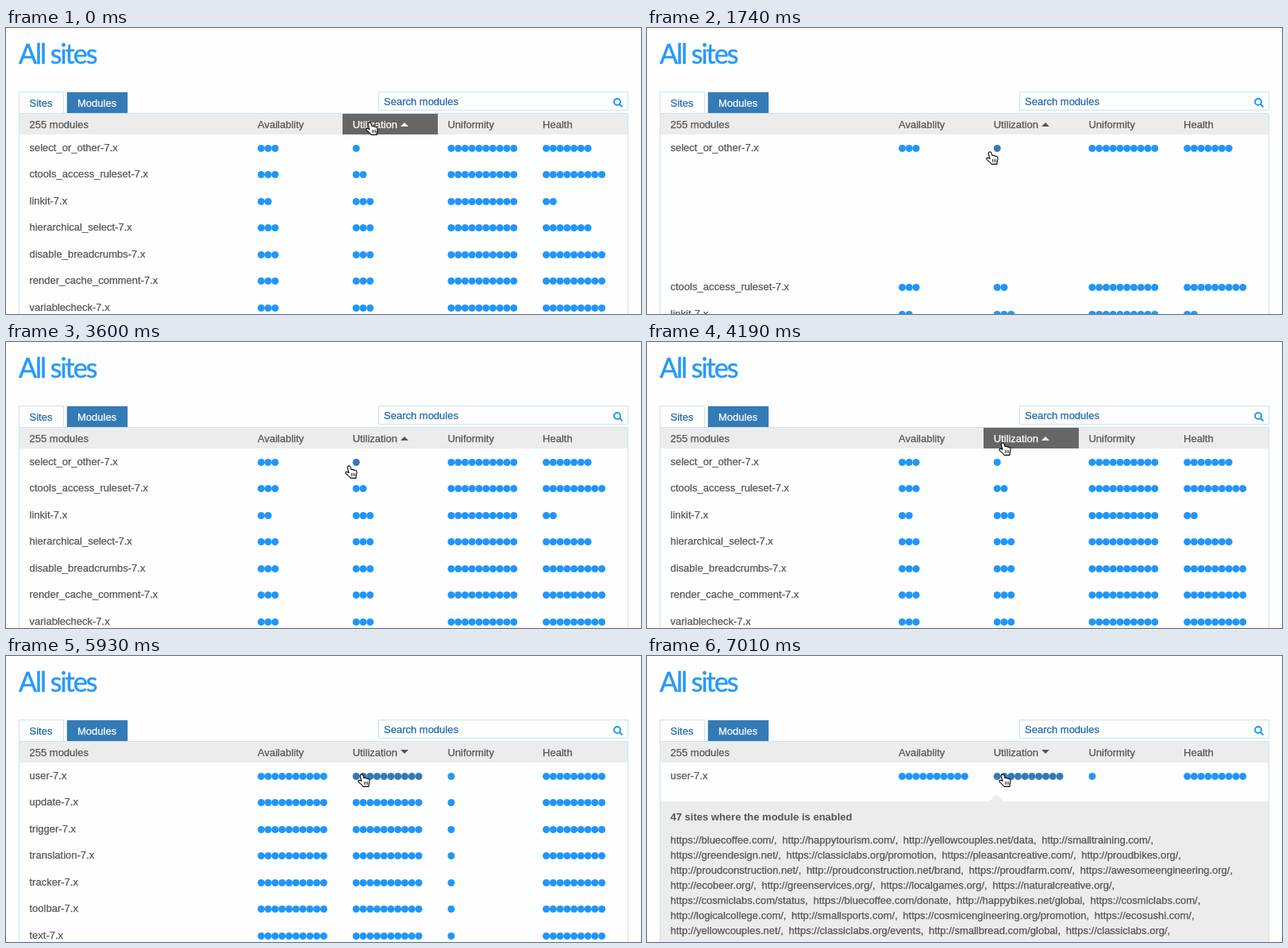
Recreate the animation shown at these times as an HTML page. Size 800 by 360 pixels, loop 8 s.

```html
<!DOCTYPE html>
<html lang="en">
<head>
<meta charset="utf-8">
<title>All sites</title>
<style>
  html, body { margin: 0; width: 100%; height: 100%; overflow: hidden; background: #fefefe; }
  svg { display: block; }
  text {
    font: 13px "Liberation Sans", Arial, sans-serif; white-space: pre;
    color: #555; fill: currentColor; stroke: currentColor; stroke-width: .25px;
  }
  .title { font: 34px Lato, sans-serif; letter-spacing: -2px; color: #2699fb; stroke-width: .5px; }
  .link { color: #2268ae; }
  .light { color: #fff; }
  .bold { font-weight: bold; stroke: none; }
  .sites { word-spacing: -.3px; }
  .dots { fill: #2196f9; }
  .dots.hover { fill: #337ab7; }
  .frame { fill: none; stroke: #cde2f1; }
</style>
</head>
<body>
<svg width="800" height="360" viewBox="0 0 800 360">
  <text class="title" x="16" y="44.5">All sites</text>
  <path class="frame" d="M16.5 108V80.5H72.5V108"/>
  <text class="link" x="29.500" y="99">Sites</text>
  <path fill="#337ab7" d="M77 81h76v26H77z"/>
  <path class="frame" d="M76.5 108V80.5H153.5V108"/>
  <text class="light" x="90" y="99">Modules</text>
  <path class="frame" d="M469.5 80.5h314v23h-314z"/>
  <text class="link" x="476" y="97">Search modules</text>
  <g fill="none" stroke="#2196f9" stroke-width="2">
    <circle cx="770" cy="93" r="4"/>
    <path d="M773 96l3.500 3.500"/>
  </g>
  <path fill="#ececec" d="M17 108h766v26H17z"/>
  <g id="view"></g>
  <path class="frame" d="M16.5 361V107.5H783.5V361"/>
  <g id="cursor" stroke="#000" stroke-linejoin="round" stroke-linecap="round">
    <path fill="#fff" stroke-width="1.1" d="M4 1.2C5.2.4 6.4 1 6.8 2.2L8 5.6c.9-.6 2-.3 2.4.5 .8-.5 1.9-.2 2.3.7 1-.4 2 .2 2.2 1.4 .4 2.300-.3 3.800-.7 5.400l-.3 2.800H7C6 14 3 12.400 1.200 10.600 .2 9.400 1.400 8 2.800 8.600L5 9.600 3.200 3.400C3 2.400 3.200 1.700 4 1.200z"/>
    <path fill="none" stroke-width=".8" d="M8.500 10.500v3M10.500 10.500v3M12.500 10.500v3"/>
  </g>
</svg>
<script>
const LOOP = 8000;
const headings = ["Availablity", "Utilization", "Uniformity", "Health"];
const columnX = i => 317 + 119.7 * i;

const ascending = [
  ["select_or_other", 3, 1, 10, 7],
  ["ctools_access_ruleset", 3, 2, 10, 9],
  ["linkit", 2, 3, 10, 2],
  ["hierarchical_select", 3, 3, 10, 7],
  ["disable_breadcrumbs", 3, 3, 10, 9],
  ["render_cache_comment", 3, 3, 10, 9],
  ["variablecheck", 3, 3, 10, 9]
];
const descending = ["user", "update", "trigger", "translation", "tracker", "toolbar", "text"]
  .map(name => [name, 10, 10, 1, 9]);

const fewSites = { count: 13, height: 129, lines: [
  "https://classiclabs.org/promotion, https://pleasantcreative.com/, https://awesomeengineering.org/, http://happybikes.net/global,",
  "http://logicalcollege.com/, http://smallsports.com/, https://cosmicengineering.org/promotion, http://yellowcouples.net/,",
  "http://smallbread.com/global, https://classiclabs.org/, http://proudconstruction.net/spanish, https://pleasantlabs.org/,",
  "https://smallbread.com/events"
] };
const manySites = { count: 47, height: 180, lines: [
  "https://bluecoffee.com/, http://happytourism.com/, http://yellowcouples.net/data, http://smalltraining.com/,",
  "https://greendesign.net/, https://classiclabs.org/promotion, https://pleasantcreative.com/, http://proudbikes.org/,",
  "http://proudconstruction.net/, http://proudconstruction.net/brand, https://proudfarm.com/, https://awesomeengineering.org/,",
  "http://ecobeer.org/, http://greenservices.org/, https://localgames.org/, https://naturalcreative.org/,",
  "https://cosmiclabs.com/status, https://bluecoffee.com/donate, http://happybikes.net/global, https://cosmiclabs.com/,",
  "http://logicalcollege.com/, http://smallsports.com/, https://cosmicengineering.org/promotion, https://ecosushi.com/,",
  "http://yellowcouples.net/, https://classiclabs.org/events, http://smallbread.com/global, https://classiclabs.org/,",
  "https://smallbread.com/status, https://localgames.org/data, http://proudbikes.org/global, https://pleasantlabs.org/,"
] };

// Pointer moves: start, end, number of steps, destination
const moves = [
  [780, 1080, 6, 428, 156],
  [1500, 1500, 1, 427, 155],
  [4020, 4190, 4, 443, 126],
  [5690, 5930, 5, 443, 148]
];

function pointerAt(t) {
  let x = 453, y = 118;
  for (const [start, end, steps, toX, toY] of moves) {
    if (t < start) break;
    const gap = (end - start) / (steps - 1) || 1;
    const p = Math.min(steps, Math.floor((t - start) / gap) + 1) / steps;
    const eased = p * p * (3 - 2 * p);
    x += (toX - x) * eased;
    y += (toY - y) * eased;
  }
  return [x, y];
}

// How far the first row is opened and how visible its panel is
function expansionAt(t) {
  if (t >= 6590) return { shift: 300, alpha: t < 7010 ? 0.9 : 1 };
  if (t < 1740 || t >= 3600) return { shift: 0, alpha: 0 };
  if (t < 1800) return { shift: 142, alpha: 0 };
  return { shift: 157.5, alpha: t < 2220 ? 0.9 : 1 };
}

const label = (x, y, content, style = "") => `<text class="${style}" x="${x}" y="${y}">${content}</text>`;

function dots(x, y, count, hover) {
  let out = "";
  for (let i = 0; i < count; i++) out += `<circle cx="${x + 4.5 + i * 8.76}" cy="${y}" r="4.5"/>`;
  return `<g class="dots${hover ? " hover" : ""}">${out}</g>`;
}

function header(hover, down) {
  const arrow = down ? "M497 118h10l-5 5z" : "M497 124h10l-5-5z";
  return (hover ? '<path fill="#666" d="M424 108h120v26H424z"/>' : "")
    + label(29.5, 126, "255 modules")
    + headings.map((name, i) => label(columnX(i), 126, name, hover && i === 1 ? "light" : "")).join("")
    + `<path fill="${hover ? "#fff" : "#555"}" d="${arrow}"/>`;
}

function row([name, ...counts], i, shift, hover) {
  const y = Math.round(155 + 33.45 * i) + (i ? shift : 0);
  return label(29.5, y, name + "-7.x")
    + counts.map((n, c) => dots(columnX(c), y - 3.5, n, hover && !i && c === 1)).join("");
}

function panel({ count, height, lines }, alpha) {
  return `<g opacity="${alpha}"><path fill="#ececec" d="M17 183H431l9-9 9 9H783v${height}H17z"/>`
    + label(29.5, 207, `${count} sites where the module is enabled`, "bold")
    + lines.map((line, i) => label(29.5, 235.5 + 19 * i, line.replaceAll(" ", "\u00a0 "), "sites")).join("") + "</g>";
}

const view = document.getElementById("view");
const cursor = document.getElementById("cursor");
let shown = "";

function draw(t) {
  const [x, y] = pointerAt(t);
  const down = t >= 4910;
  const { shift, alpha } = expansionAt(t);
  const markup = header(y < 134, down)
    + (down ? descending : ascending).map((r, i) => row(r, i, shift, y > 145)).join("")
    + (alpha ? panel(down ? manySites : fewSites, alpha) : "");
  if (markup !== shown) view.innerHTML = shown = markup;
  cursor.setAttribute("transform", `translate(${Math.round(x)} ${Math.round(y)})`);
}

const begin = performance.now();
function tick() {
  draw((performance.now() - begin) % LOOP);
  requestAnimationFrame(tick);
}
tick();
</script>
</body>
</html>
```
